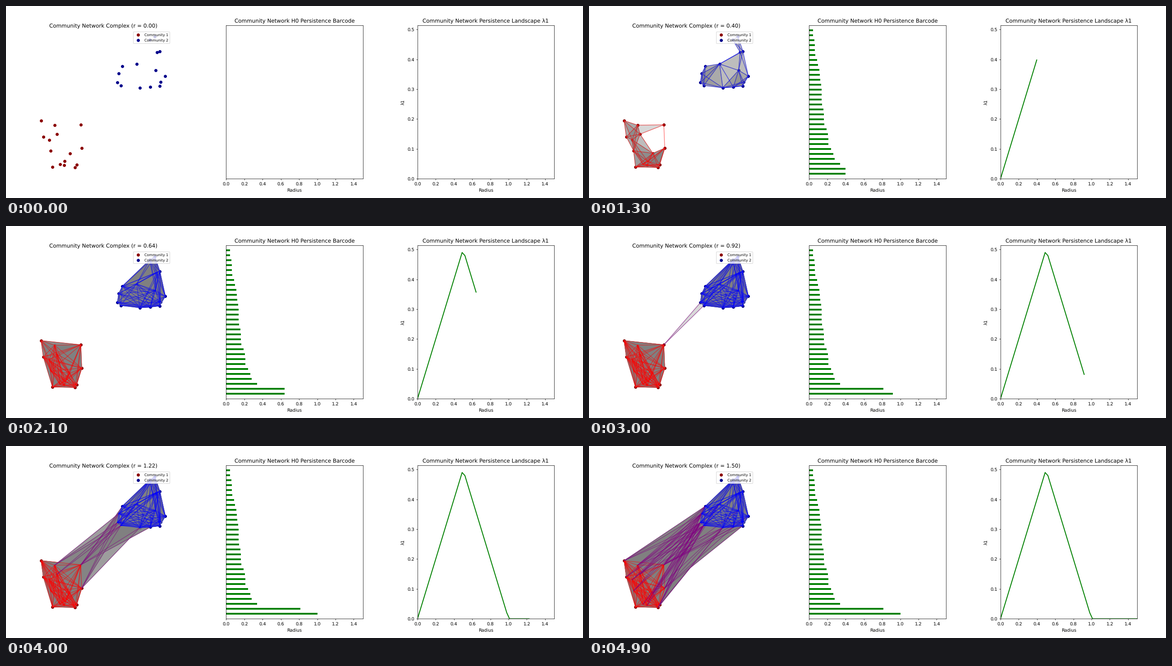
Animation of 1280x427 px, one loop 5000 ms. Source, as a matplotlib script:

```python
import itertools

import matplotlib.pyplot as plt
import numpy as np
from matplotlib.animation import FuncAnimation
from matplotlib.collections import LineCollection, PolyCollection

plt.rcParams["font.family"] = "DejaVu Sans"
plt.rcParams["text.hinting"] = "none"

WIDTH, HEIGHT = 1280, 427
DPI = WIDTH / 18
FRAMES = 50
UNIT = 152.3  # stage pixels per unit of radius
MAX_RADIUS = 1.5
CAP = 1.0  # the endless component is cut off here

COMMUNITY_1 = [
    (77.8, 255), (107.8, 265), (166, 264.2), (82.8, 290.8), (95.6, 297.6),
    (113.2, 285), (99, 322), (168, 316.2), (141.6, 327.6), (130.4, 345.5),
    (119.8, 352.3), (128.8, 354.5), (103.2, 358.1), (153.3, 359), (156.7, 353.3),
]
COMMUNITY_2 = [
    (318.7, 75.3), (330.2, 68), (335.2, 102.7), (341.4, 100.5), (289.7, 128.9),
    (258.3, 133.9), (249.8, 150.5), (247.2, 170.2), (254.8, 176.8), (296.8, 181.8),
    (320.2, 180.4), (340.8, 177.6), (343, 169), (353.5, 156), (331.8, 143.2),
]
points = np.array(COMMUNITY_1 + COMMUNITY_2)
count, split = len(points), len(COMMUNITY_1)
dist = np.hypot(*(points[:, None] - points[None]).transpose(2, 0, 1)) / UNIT


def component_deaths():
    """Radii at which components merge, by Kruskal's rule."""
    label = np.arange(count)
    deaths = []
    for i, j in sorted(itertools.combinations(range(count), 2), key=lambda e: dist[e]):
        if label[i] != label[j]:
            label[label == label[j]] = label[i]
            deaths.append(dist[i, j])
    return np.array(deaths + [CAP])


def edge_color(i, j):
    if j < split:
        return "red"
    return "blue" if i >= split else "purple"


edges = np.array(list(itertools.combinations(range(count), 2)))
edge_birth = dist[edges[:, 0], edges[:, 1]]
edge_colors = np.array([edge_color(i, j) for i, j in edges])
triangles = np.array(list(itertools.combinations(range(count), 3)))
a, b, c = triangles.T
triangle_birth = np.max([dist[a, b], dist[a, c], dist[b, c]], axis=0)

radii = np.linspace(0, MAX_RADIUS, FRAMES)
deaths = component_deaths()
landscape = np.maximum(np.minimum(radii, CAP - radii), 0)

# The small excess guards against truncation to one pixel less.
fig, (ax_net, ax_bar, ax_land) = plt.subplots(
    1, 3, figsize=((WIDTH + 1e-3) / DPI, (HEIGHT + 1e-3) / DPI), dpi=DPI)
fig.subplots_adjust(left=0.05, right=0.95, bottom=0.1, top=0.9, wspace=0.4)

# Network, laid out in stage pixels
ax_net.set(xlim=(64, 367.16), ylim=(373.65, 53.35), aspect="equal")
ax_net.axis("off")
net_title = ax_net.set_title("")
for part, color, name in ((points[:split], "darkred", "Community 1"),
                          (points[split:], "darkblue", "Community 2")):
    ax_net.scatter(*part.T, s=36, color=color, label=name)
faces = PolyCollection([], facecolors="gray", edgecolors="gray", alpha=0.3,
                       linewidths=1, zorder=1)
links = LineCollection([], linewidths=1.5, alpha=0.5, capstyle="projecting", zorder=2)
ax_net.add_collection(faces, autolim=False)
ax_net.add_collection(links, autolim=False)
ax_net.legend(loc="upper right", fontsize=8)

# Barcode
ax_bar.set(xlim=(0, MAX_RADIUS), ylim=(-1, count), yticks=[], xlabel="Radius",
           title="Community Network H0 Persistence Barcode")
bars = LineCollection([], colors="green", linewidths=4, zorder=2)
ax_bar.add_collection(bars, autolim=False)

# Landscape
ax_land.set(xlim=(0, MAX_RADIUS), ylim=(0, landscape.max() * 1.05),
            xlabel="Radius", ylabel="λ1",
            title="Community Network Persistence Landscape λ1")
curve, = ax_land.plot([], [], color="green", lw=2)


def draw(frame):
    r = radii[frame]
    net_title.set_text(f"Community Network Complex (r = {r:.2f})")

    faces.set_verts(points[triangles[triangle_birth <= r]])
    alive = edge_birth <= r
    links.set_segments(points[edges[alive]])
    links.set_color(list(edge_colors[alive]))

    rows = range(count - 1, -1, -1)
    bars.set_segments([[(0, y), (min(d, r), y)] for y, d in zip(rows, deaths)]
                      if r > 0 else [])
    curve.set_data(radii[:frame + 1], landscape[:frame + 1])
    return net_title, faces, links, bars, curve


anim = FuncAnimation(fig, draw, frames=FRAMES, interval=100, repeat=True,
                     repeat_delay=0, blit=False)
plt.show()
```
